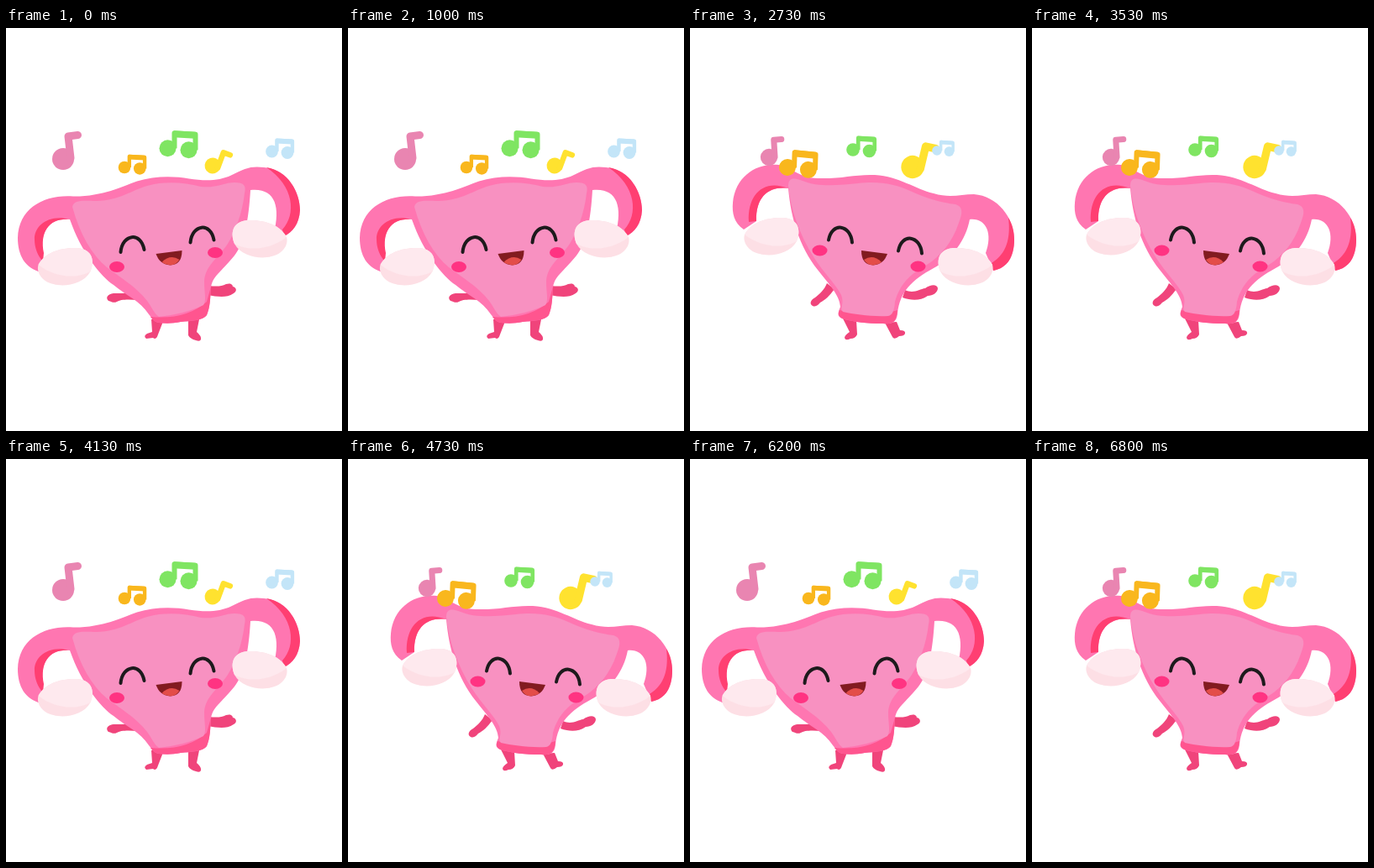
Write an HTML page that moves like this. It is 400 px wide and 480 px high and loops after 6.99 s.

```html
<!DOCTYPE html>
<html lang="en">
<head>
<meta charset="utf-8">
<title>Dancing uterus</title>
<style>
  html, body { margin: 0; width: 100%; height: 100%; overflow: hidden; background: #fff; }
  svg { display: block; width: 100%; height: 100%; }
  .skin { fill: #ff76b1; }
  .light { fill: #f891c1; }
  .base { fill: #ff558f; }
  .shade { fill: #ff3f72; }
  .limb { fill: #f0447b; }
  .cheek { fill: #ff3382; }
  .pink { color: #e985b1; }
  .orange { color: #f9b71d; }
  .green { color: #7fe562; }
  .yellow { color: #ffe22f; }
  .blue { color: #c3e5f8; }
</style>
</head>
<body>
<svg viewBox="0 0 400 480">
  <defs>
    <g id="single" fill="currentColor">
      <circle r="13"/>
      <path d="M9-1L6-27L17.500-28.500" fill="none" stroke="currentColor" stroke-width="9" stroke-linecap="round" stroke-linejoin="round"/>
    </g>
    <g id="double" fill="currentColor">
      <circle r="10"/>
      <circle cx="25" cy="2" r="10"/>
      <path d="M8 0V-18L33-16.500V2" fill="none" stroke="currentColor" stroke-width="6" stroke-linejoin="round"/>
      <path d="M7-17L33-15.500" stroke="currentColor" stroke-width="8"/>
    </g>
    <g id="egg">
      <path d="M-32-2C-24-17-5-23 15-22C33-20 35-6 30 6C22 21-1 25-14 21C-26 19-35 8-32-2Z" fill="#fddfe5"/>
      <path d="M-32-2C-24-17-5-23 15-22C33-20 35-6 30 6C16 14-10 15-32-2Z" fill="#fee9ee"/>
    </g>
    <path id="eye" d="M-14 10.500C-12-11 10-14.500 14 7.500" fill="none" stroke="#1d1a1c" stroke-width="4" stroke-linecap="round"/>
    <g id="mouth">
      <path d="M-16-4L15-8C15 4 10 9 1 9.500C-8 9-13 4-16-4Z" fill="#821b20"/>
      <path d="M-9 6Q1-4 12 3Q8 9 1 9.500Q-5 9-9 6Z" fill="#e34d49"/>
    </g>
  </defs>

  <g id="left">
    <path class="limb" d="M150 313C142 317 136 316 128 316C121 317 118 321 122 325C126 326 128 328 132 326C136 323 146 323 158 324Z
      M241 307C251 308 256 308 262 305C269 303 270 307 270 308C275 309 275 314 271 316C262 322 252 320 240 318Z
      M173 347L188 347L181 365Q179 372 175 369L167 370Q163 367 168 364L174 362Z
      M217 344L231 342L227 362Q233 367 232 371Q231 374 226 372Q219 370 217 366Z"/>
    <path class="skin" d="M42 291C22 286 14 270 14 250C15 214 46 198 80 200.500C114 201 138 189 156 182.500C176 176 200 176 218 179.500C238 182.500 254 182 268 175.500C284 167 292 164 307 166C336 168 350 196 350 217C349 234 341 243 331 248L319 244C327 212 320 190 291 193C289 228 284 256 272 271C256 291 245 296 244 310C243 324 243 332 239 342C235 348 220 349 208 350C198 352 190 352 182 351C176 350 174 346 170 341C160 325 142 318 128 306C113 296 90 268 76 228C52 226 40 242 44 268Z"/>
    <path class="shade" d="M76 228C52 221 33 235 34 252C34 262 38 272 44 278L45 268C40 242 52 226 76 228Z
      M310 166C336 170 350 196 350 217C349 234 341 243 331 248L329 240C346 222 343 188 310 166Z"/>
    <path class="base" d="M172 344Q214 348 239 326L244 308C243 324 243 332 239 342C235 348 220 349 208 350C198 352 190 352 182 351Q176 350 172 344Z"/>
    <path class="light" d="M79 213C81 204 92 206 108 206C136 205 150 193 168 188C190 182 212 184 232 189C250 191 260 184 272 184C284 184 286 188 284 197C281 222 273 242 264 257C251 276 237 283 236 302C236 316 239 324 235 330C222 337 200 342 182 344C176 340 174 333 168 325C154 307 134 296 120 285C102 270 88 246 79 213Z"/>
    <use href="#egg" x="70.500" y="284"/>
    <use href="#egg" transform="translate(302 251) scale(-1 1)"/>
    <use href="#eye" x="150.500" y="256.500"/>
    <use href="#eye" x="233.500" y="245"/>
    <use href="#mouth" x="194.500" y="273"/>
    <ellipse class="cheek" cx="132" cy="284.500" rx="9" ry="6.500"/>
    <ellipse class="cheek" cx="249" cy="267.500" rx="9" ry="6.500"/>
    <use href="#single" class="pink" x="68" y="156"/>
    <use href="#double" class="orange" transform="translate(141 166) scale(.73)"/>
    <use href="#double" class="green" x="192.500" y="143.300"/>
    <use href="#single" class="yellow" transform="translate(246 164) rotate(27) scale(.73)"/>
    <use href="#double" class="blue" transform="translate(316.500 147) scale(.74)"/>
  </g>

  <g id="right">
    <path class="limb" d="M163 304C160 312 154 317 149 321C143 324 142 329 146 331C150 333 153 329 155 327C161 324 166 319 172 311Z
      M256 312C266 317 273 311 280 310C287 305 294 305 295 310C295 315 289 319 283 319C274 325 264 325 253 321Z
      M182 346L198 348L199 365Q197 370 191 370Q185 373 184 369Q184 366 190 362Z
      M232 351L246 350L250 360Q257 360 256 364Q255 367 249 367Q243 372 241 368Z"/>
    <path class="skin" d="M64 240C52 232 50 220 51 208C54 176 80 160 106 163C122 166 128 178 152 179C180 180 196 174 220 175C250 177 268 192 290 197C310 203 322 198 338 198C366 200 386 226 386 252C386 272 378 286 361 289L352 268C361 244 352 226 333 228C328 254 312 274 290 286C264 300 250 314 247 340C246 351 240 353 230 352C210 352 196 350 184 347C174 344 176 340 179 332C178 318 166 306 152 288C130 260 120 226 117 191C95 188 78 200 79 230Z"/>
    <path class="shade" d="M117 191C88 179 68 198 70 231L79 230C78 200 95 188 117 191Z
      M379 226C384 234 386 243 386 252C386 272 378 286 361 289L359 280C377 269 382 250 379 226Z"/>
    <path class="base" d="M178 336Q216 346 247 336C246 351 240 353 230 352C210 352 196 350 184 347Q174 344 178 336Z"/>
    <path class="light" d="M117 188C117 178 124 178 134 182C152 190 180 187 200 185C226 182 244 186 262 194C284 204 300 208 316 210C326 213 324 222 320 232C312 256 298 272 282 282C260 294 250 306 244 326Q243 342 236 343C216 344 196 341 182 338C178 334 184 328 180 318C174 306 158 290 148 274C130 246 120 216 117 188Z"/>
    <use href="#egg" x="97" y="248"/>
    <use href="#egg" transform="translate(328 284) scale(-1 1)"/>
    <use href="#eye" transform="translate(179 245) scale(-1 1)"/>
    <use href="#eye" transform="translate(262 258) scale(-1 1)"/>
    <use href="#mouth" transform="translate(219 273) scale(-1 1)"/>
    <ellipse class="cheek" cx="154.500" cy="265" rx="9" ry="6.500"/>
    <ellipse class="cheek" cx="271.500" cy="284" rx="9" ry="6.500"/>
    <use href="#single" class="pink" transform="translate(94 154) rotate(3) scale(.78)"/>
    <use href="#double" class="orange" transform="translate(116 166) rotate(2)"/>
    <use href="#double" class="green" transform="translate(194 145) scale(.78)"/>
    <use href="#single" class="yellow" transform="translate(265 165.500) rotate(20) scale(1.050)"/>
    <use href="#double" class="blue" transform="translate(294 146) scale(.58)"/>
  </g>
</svg>
<script>
  const LOOP = 6990;
  const flips = [530, 1000, 1470, 2000, 2530, 3000, 3530, 4000, 4530, 5000, 5530, 6000, 6530];
  const poses = ['left', 'right'].map(id => document.getElementById(id));

  function draw() {
    const t = performance.now() % LOOP;
    const pose = flips.filter(f => f <= t).length % 2;
    poses.forEach((g, i) => g.style.display = i === pose ? '' : 'none');
    requestAnimationFrame(draw);
  }
  draw();
</script>
</body>
</html>
```
